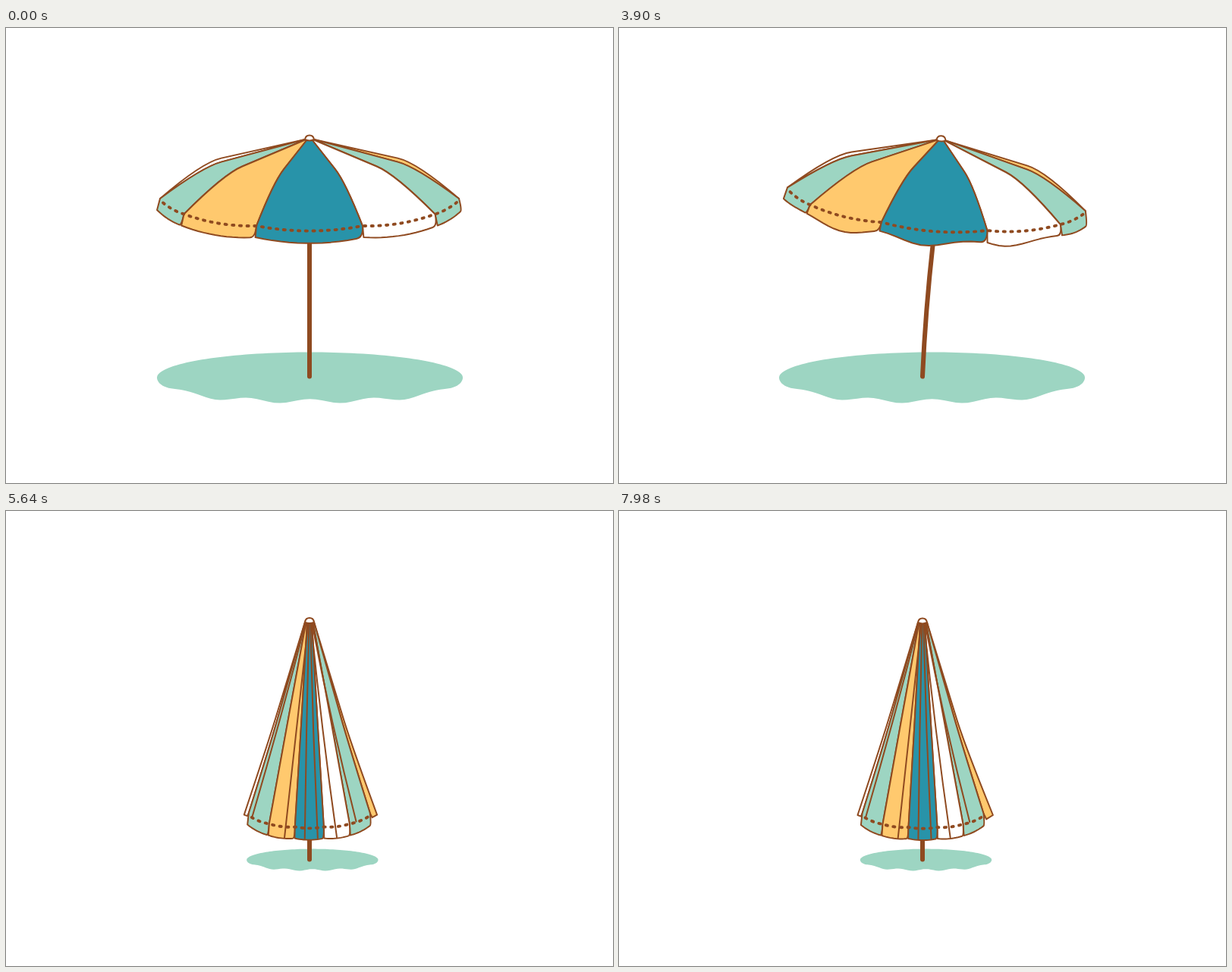
Write an HTML page with a canvas that moves like this. It is 800 px wide and 600 px high and loops after 8000 ms.

```html
<!DOCTYPE html>
<html lang="en">
<head>
<meta charset="utf-8">
<title>Beach umbrella</title>
<style>
  html, body { margin: 0; width: 100%; height: 100%; overflow: hidden; background: #fff; }
  canvas { display: block; width: 800px; height: 600px; }
</style>
</head>
<body>
<canvas id="stage"></canvas>
<script>
const LOOP = 8000, STEP = 30, TAU = Math.PI * 2;
const CX = 400, TOP = 147, BASE = 460;
const BROWN = '#8f4a20', TEAL = '#2893a9', YELLOW = '#ffc96e', MINT = '#9dd5c2', WHITE = '#fff';

const canvas = document.getElementById('stage');
const ctx = canvas.getContext('2d');
const dpr = window.devicePixelRatio || 1;
canvas.width = 800 * dpr;
canvas.height = 600 * dpr;

// Hem of one half, centre outwards, measured from the tip: open, half closed, shut
const hemKeys = [
  { x: [70, 50.5, 19], y: [114, 257.5, 270] },
  { x: [165.5, 113, 53], y: [98.5, 249, 266] },
  { x: [197, 144.5, 80], y: [78, 229, 252] }
];
// Creases: panel, then place across it when half closed and when shut
const creases = [[1, 0.73, 0.6], [2, 0.2, 0.34], [2, 0.68, 0.79], [3, 0.3, 0.5], [0, 0.2, 0.2], [4, 0.3, 0.3]];
// Panels back to front
const panels = [[0, MINT], [4, MINT], [1, YELLOW], [3, WHITE], [2, TEAL]];

const clamp = v => Math.max(0, Math.min(1, v));
const lerp = (a, b, p) => a + (b - a) * p;
const smooth = v => { v = clamp(v); return v * v * (3 - 2 * v); };
const ramp = (t, from, length) => smooth((t - from) / length);
const bump = (t, mid, reach) => 0.5 + 0.5 * Math.cos(Math.PI * clamp(Math.abs(t - mid) / reach));
// Parabola through the three poses at u = 0, 0.5, 1
const blend = (u, [a, b, c]) => a * (1 - u) * (1 - 2 * u) + b * 4 * u * (1 - u) + c * u * (2 * u - 1);
// Point on a sagging line between a and b
const sagging = (a, b, s, sag) => {
  const k = 2 * s * (1 - s) * sag;
  return [lerp(a[0], b[0], s) - (b[1] - a[1]) * k, lerp(a[1], b[1], s) + (b[0] - a[0]) * k];
};

function closing(t) {
  const p = clamp((t - 4500) / 1140);
  return p < 0.5 ? 4 * p ** 3 : 1 - 4 * (1 - p) ** 3;
}
function tiltAt(t) {
  const lean = 4.9 * ramp(t, 1100, 2600) * (1 - ramp(t, 3800, 560));
  return (lean - 1.1 * bump(t, 4500, 250)) * Math.PI / 180;
}
const swayAt = t => -4 * bump(t, 5900, 550) - 1.5 * ramp(t, 7620, 360);
const liftAt = t => -2 * bump(t, 4540, 200) - 3 * bump(t, 5400, 320);

// Wind enters from the left and dies down before closing
function gust(x, t) {
  return clamp((198 + 0.25 * (t - 330) - x) / 300) * (1 - ramp(t, 3700, 650));
}
function blow([x, y], t) {
  const g = gust(x, t);
  return [x + 2.5 * g * (1 + Math.cos(TAU * (t - 2460) / 960)),
    y - 4.5 * g * Math.cos(TAU * (x - 387 - 0.26 * (t - 2460)) / 107)];
}

function paint(fill, width = 2) {
  if (fill) { ctx.fillStyle = fill; ctx.fill(); }
  ctx.strokeStyle = BROWN;
  ctx.lineWidth = width;
  ctx.stroke();
}

function drawShade(t, u) {
  const size = blend(u, [1, 0.78, 0.43]);
  const slide = 12 * ramp(t, 1400, 1000) * (1 - ramp(t, 3900, 450)) + swayAt(t);
  const drift = 15 * bump(t, 2460, 900) - 18 * bump(t, 5070, 600);
  const cx = blend(u, [400.5, 401.5, 406]) + slide, cy = blend(u, [461, 456, 460]);
  ctx.beginPath();
  for (let i = 0; i < 160; i++) {
    const a = TAU * i / 160, c = Math.cos(a), x = 201.5 * c;
    let y = 33.5 * Math.sin(a);
    if (y > 0) {
      const edge = Math.sqrt(Math.max(0, 1 - Math.abs(c) ** 2.6));
      y = 31 * edge - 2.8 * Math.min(1, 2 * edge) * Math.cos(TAU * (x - drift) / 82);
    }
    ctx.lineTo(cx + x * size, cy + y * size);
  }
  ctx.fillStyle = MINT;
  ctx.fill();
}

function drawPole(tilt) {
  const s = Math.sin(tilt), c = Math.cos(tilt), bend = 38 * tilt;
  ctx.beginPath();
  ctx.moveTo(CX, BASE - 0.5);
  ctx.quadraticCurveTo(CX + 88 * s - bend, BASE - 88 * c, CX + 177 * s, BASE - 177 * c);
  ctx.lineTo(CX + 305 * s, BASE - 305 * c);
  paint(null, 6);
}

// Eight ribs from left to right; the first and last belong to the far side
function makeRibs(t, u) {
  const kx = blend(u, [0.48, 0.46, 0.57]), kStep = blend(u, [0.055, 0.045, -0.025]);
  const ky = blend(u, [0.34, 0.485, 0.5]), kyStep = 0.02 * (1 - u);
  const spread = Math.max(0, blend(u, [0, 0, 1])), sway = swayAt(t);
  const flutter = 11 * ramp(t, 5500, 500) * (1 - Math.cos(TAU * (t - 6480) / 1270));
  return [-3, -2, -1, 0, 0, 1, 2, 3].map((n, order) => {
    const side = order < 4 ? -1 : 1, i = Math.min(Math.abs(n), 2), far = Math.abs(n) === 3;
    const x = blend(u, hemKeys[i].x) + (far ? 6 * spread : 0);
    const y = blend(u, hemKeys[i].y) + (far ? 2 * spread : 0);
    const shift = 2 * u * u + sway;
    const tip = [CX + side * (3 + 1.5 * i), TOP];
    const knee = [CX + side * x * (kx + kStep * i) + shift / 2, TOP + y * (ky + kyStep * i) - (far ? 5 * (1 - u) : 0)];
    const hem = [CX + side * x + shift + (order === 7 ? flutter : 0), TOP + y];
    const f = 0.27 * Math.hypot(hem[0] - knee[0], hem[1] - knee[1]) / Math.hypot(knee[0] - tip[0], knee[1] - tip[1]);
    const bend = [lerp(tip[0], knee[0], 1 + f), lerp(tip[1], knee[1], 1 + f)];
    const drop = [hem[0] + side * x * 0.02, hem[1] + 15];
    return { tip, knee, bend, hem, drop };
  });
}

function down({ tip, knee, bend, hem }) {
  ctx.moveTo(...tip);
  ctx.lineTo(...knee);
  ctx.quadraticCurveTo(...bend, ...hem);
}
function up({ tip, knee, bend }) {
  ctx.quadraticCurveTo(...bend, ...knee);
  ctx.lineTo(...tip);
  ctx.closePath();
}

function drawFarPanel(outer, inner, fill) {
  const d = outer.hem[0] - inner.hem[0];
  ctx.beginPath();
  down(outer);
  ctx.lineTo(inner.hem[0] + 0.3 * d, inner.hem[1] + 0.6 * Math.abs(d));
  ctx.lineTo(...inner.hem);
  up(inner);
  paint(fill);
}

function drawPanel(left, right, fill, t) {
  ctx.beginPath();
  down(left);
  for (let s = 0; s < 0.95; s += 0.0775) {
    ctx.lineTo(...blow(sagging(left.drop, right.drop, s, 0.11), t));
  }
  ctx.quadraticCurveTo(...blow(right.drop, t), ...right.hem);
  up(right);
  paint(fill);
}

function drawCreases(ribs, u) {
  const late = clamp(2 * u - 1);
  for (const [p, a, b] of creases) {
    const outer = p % 4 === 0;
    const grow = outer ? clamp((u - 0.55) / 0.3) : clamp((u - 0.1) / 0.4);
    if (!grow) continue;
    const [x, y] = sagging(ribs[p + 1].hem, ribs[p + 2].hem, lerp(a, b, late), 0.1);
    const ax = CX + (p - 2) * 2 + (lerp(a, b, late) - 0.5) * 4, ay = TOP + 1;
    const dx = (x - ax) * grow, dy = (y + (outer ? 0 : lerp(-18, 14, late)) - ay) * grow;
    const bow = -(4 + 0.16 * (x - CX)) * lerp(1, 0.3, late) * grow;
    ctx.beginPath();
    ctx.moveTo(ax, ay);
    ctx.quadraticCurveTo(ax + dx / 2 + bow, ay + dy / 2, ax + dx, ay + dy);
    paint();
  }
}

function drawSeam(ribs) {
  const pts = ribs.slice(1, 7).map(r => r.hem);
  pts[0] = [pts[0][0] + 4, pts[0][1] + 5.5];
  pts[5] = [pts[5][0] - 3, pts[5][1] + 5];
  ctx.beginPath();
  for (let i = 0; i < 5; i++) {
    for (let s = 0; s <= 1; s += 0.125) ctx.lineTo(...sagging(pts[i], pts[i + 1], s, 0.095));
  }
  ctx.setLineDash([2.2, 7.5]);
  paint(null, 3.9);
  ctx.setLineDash([]);
}

function drawCap() {
  ctx.beginPath();
  ctx.moveTo(CX - 6, TOP);
  ctx.bezierCurveTo(CX - 5, TOP - 7.5, CX + 5, TOP - 7.5, CX + 6, TOP);
  ctx.quadraticCurveTo(CX, TOP + 3, CX - 6, TOP);
  ctx.closePath();
  paint(WHITE);
}

function draw(t) {
  const u = closing(t), tilt = tiltAt(t), ribs = makeRibs(t, u);
  ctx.setTransform(dpr, 0, 0, dpr, 0, 0);
  ctx.fillStyle = WHITE;
  ctx.fillRect(0, 0, 800, 600);
  ctx.lineCap = ctx.lineJoin = 'round';
  drawShade(t, u);
  drawPole(tilt);
  ctx.translate(CX, BASE);
  ctx.rotate(tilt);
  ctx.translate(-CX, liftAt(t) - BASE);
  drawFarPanel(ribs[0], ribs[1], WHITE);
  drawFarPanel(ribs[7], ribs[6], YELLOW);
  for (const [p, fill] of panels) drawPanel(ribs[p + 1], ribs[p + 2], fill, t);
  drawCreases(ribs, u);
  drawSeam(ribs);
  drawCap();
}

const start = performance.now();
function tick() {
  const t = (performance.now() - start) % LOOP;
  draw(Math.floor(t / STEP) * STEP);
  requestAnimationFrame(tick);
}
tick();
</script>
</body>
</html>
```
